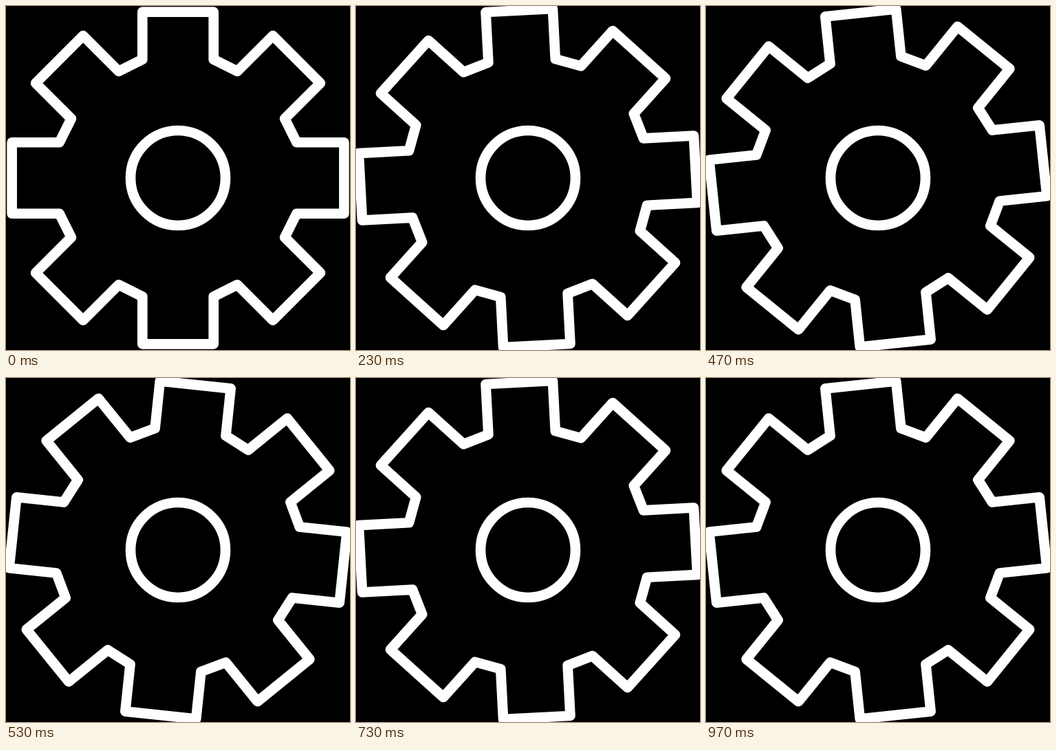
Write an HTML page with a canvas that moves like this. It is 500x500 px and loops after 1.01 s.

```html
<!DOCTYPE html>
<html lang="en">
<head>
<meta charset="utf-8">
<title>Spinning gear</title>
<style>
html, body { margin: 0; width: 100%; height: 100%; overflow: hidden; background: #000; }
canvas { display: block; width: 100%; height: 100%; }
</style>
</head>
<body>
<canvas id="stage" width="500" height="500"></canvas>
<script>
const ctx = document.getElementById('stage').getContext('2d');
const SIZE = 500;
const UNIT = SIZE / 58;
const LOOP = 1010;
const STEPS = 30;

// One quarter of the outline, in grid units around the centre
const QUARTER = [[6, -28], [6, -20], [10, -18], [16, -24], [24, -16], [18, -10], [20, -6], [28, -6]];

const gear = new Path2D();
for (let q = 0; q < 4; q++) {
  for (let [x, y] of QUARTER) {
    for (let i = 0; i < q; i++) [x, y] = [-y, x];
    gear.lineTo(x, y);
  }
}
gear.closePath();

const hub = new Path2D();
hub.arc(0, 0, 8, 0, Math.PI * 2);

// 30 steps per second, each starting on a 10 ms tick
function stepAt(ms) {
  const tick = Math.floor(ms / 10);
  return Math.min(STEPS - 1, Math.floor((3 * tick + 1) / 10));
}

function draw(ms) {
  ctx.setTransform(1, 0, 0, 1, 0, 0);
  ctx.fillStyle = '#000';
  ctx.fillRect(0, 0, SIZE, SIZE);
  ctx.translate(SIZE / 2, SIZE / 2);
  ctx.scale(UNIT, UNIT);
  ctx.strokeStyle = '#fff';
  ctx.lineWidth = 1.7;
  ctx.lineJoin = 'round';
  ctx.stroke(hub);
  ctx.rotate(Math.PI * stepAt(ms) / STEPS);
  ctx.stroke(gear);
}

const start = performance.now();
function loop() {
  draw((performance.now() - start) % LOOP);
  requestAnimationFrame(loop);
}
loop();
</script>
</body>
</html>
```
